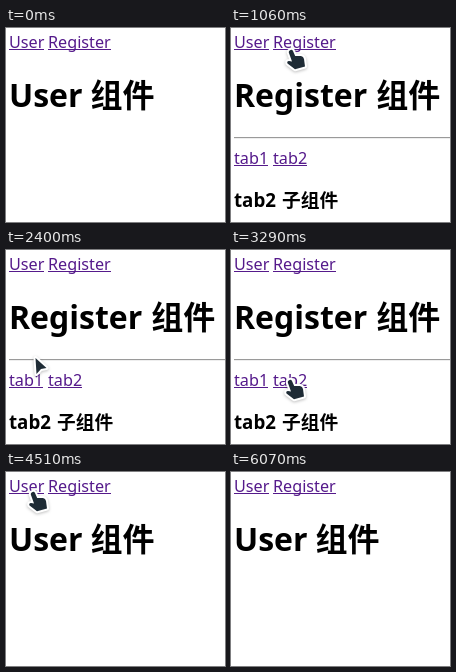
An HTML page for the animation above (6170 ms loop, 219 by 194 pixels).

```html
<!DOCTYPE html>
<html lang="zh">
<head>
<meta charset="utf-8">
<title>Router demo</title>
<style>
  html, body { margin: 0; width: 100%; height: 100%; overflow: hidden; background: #fff; }
  svg { display: block; width: 219px; height: 194px; }
  text { font-family: "Noto Sans", "Noto Sans CJK SC", "Noto Sans CJK", sans-serif; }
  .link { font-size: 16.2px; fill: #551a8b; }
  .link.active { fill: #f00; }
  .h1 { font-size: 32px; font-weight: 700; }
  .h3 { font-size: 18.72px; font-weight: 700; }
  .cursor path { fill: #1e2b35; stroke: #fff; stroke-width: 4; stroke-linejoin: round; paint-order: stroke; }
  .cursor { filter: drop-shadow(0 1px 1.5px rgba(0, 0, 0, .25)); }
</style>
</head>
<body>
<svg viewBox="0 0 219 194">
  <g class="link" id="user"><text x="3" y="20">User</text><rect x="3" y="21" width="35" height="1"/></g>
  <g class="link" id="register"><text x="42" y="20">Register</text><rect x="42" y="21" width="63" height="1"/></g>

  <text class="h1" id="userPage" x="3" y="79">User <tspan x="84.5">组件</tspan></text>

  <g id="registerPage">
    <text class="h1" x="3" y="79">Register <tspan x="145.2">组件</tspan></text>
    <rect x="3" y="109" width="216" height="1" fill="#9a9a9a"/>
    <rect x="3" y="110" width="216" height="1" fill="#eee"/>
    <g class="link" id="tab1"><text x="3" y="136">tab1</text><rect x="3" y="137" width="34" height="1"/></g>
    <g class="link" id="tab2"><text x="42" y="136">tab2</text><rect x="42" y="137" width="34" height="1"/></g>
    <text class="h3" x="3" y="179"><tspan id="child">tab2</tspan> <tspan x="51">子组件</tspan></text>
  </g>

  <g class="cursor" id="arrow"><path d="M1.5 2 L12.5 12 L7 13 L2.5 18 Z"/></g>
  <g class="cursor" id="hand">
    <path d="M6 2.2 Q8 1 9 3 L11.2 8 L17 8 Q19.5 8.5 20 11 L21 18.5 L11 21.2 L3.5 15.5 Q2.5 13 5 13 L8 13.5 L4.8 4.5 Q4.5 3 6 2.2 Z"/>
  </g>
</svg>
<script>
const LOOP = 6170;
const $ = id => document.getElementById(id);

// Pointer: start time, shape, x, y
const A = 'arrow', H = 'hand';
const pointer = [
  [0],
  [410, A, 177, 168], [520, A, 150, 120], [630, A, 112, 72], [740, A, 84, 42], [850, H, 53, 20],
  [1180, H, 44, 17], [1290, H, 28, 16], [1400, H, 20, 15],
  [1740, H, 36, 10], [1850, H, 52, 5], [2070, A, 62, 24], [2180, A, 68, 33],
  [2280, A, 48, 72], [2400, A, 28, 106], [2500, H, 20, 126], [2840, H, 18, 127],
  [2960, H, 62, 127], [3290, H, 52, 128], [3390, H, 20, 122], [3500, H, 17, 118],
  [3730, H, 62, 122], [3830, H, 63, 124],
  [3940, A, 56, 104], [4050, A, 46, 72], [4170, A, 36, 44], [4280, H, 26, 24], [4390, H, 20, 18],
  [4610, H, 32, 15], [4730, H, 54, 12], [4950, A, 92, 52], [5070, A, 140, 100], [5170, A, 174, 127],
  [5290, A, 92, 60], [5400, H, 22, 15], [5630, A, 70, 40], [5740, A, 134, 75],
  [5850, A, 168, 112], [5960, A, 200, 170], [6070]
];

// View: start time, page, child tab, pressed link
const U = 'user', R = 'register';
const views = [
  [0, U], [950, U, '', R], [1060, R, 'tab2'], [1630, U], [1960, R, 'tab2'],
  [2610, R, 'tab2', 'tab1'], [2730, R, 'tab1'], [3170, R, 'tab2'],
  [3500, R, 'tab2', 'tab1'], [3610, R, 'tab1'], [3830, R, 'tab2'],
  [4510, U], [4840, R, 'tab2'], [5510, U]
];

const at = (rows, t) => rows.findLast(row => row[0] <= t);
const show = (id, on) => $(id).setAttribute('visibility', on ? 'visible' : 'hidden');

function render(t) {
  const [, shape, x, y] = at(pointer, t);
  for (const id of [A, H]) show(id, id === shape);
  if (shape) $(shape).setAttribute('transform', `translate(${x} ${y})`);

  const [, page, child, pressed] = at(views, t);
  show('userPage', page === U);
  show('registerPage', page === R);
  if (child) $('child').textContent = child;
  for (const id of [U, R, 'tab1', 'tab2']) $(id).classList.toggle('active', id === pressed);
}

function tick() {
  render(performance.now() % LOOP);
  requestAnimationFrame(tick);
}
tick();
</script>
</body>
</html>
```
